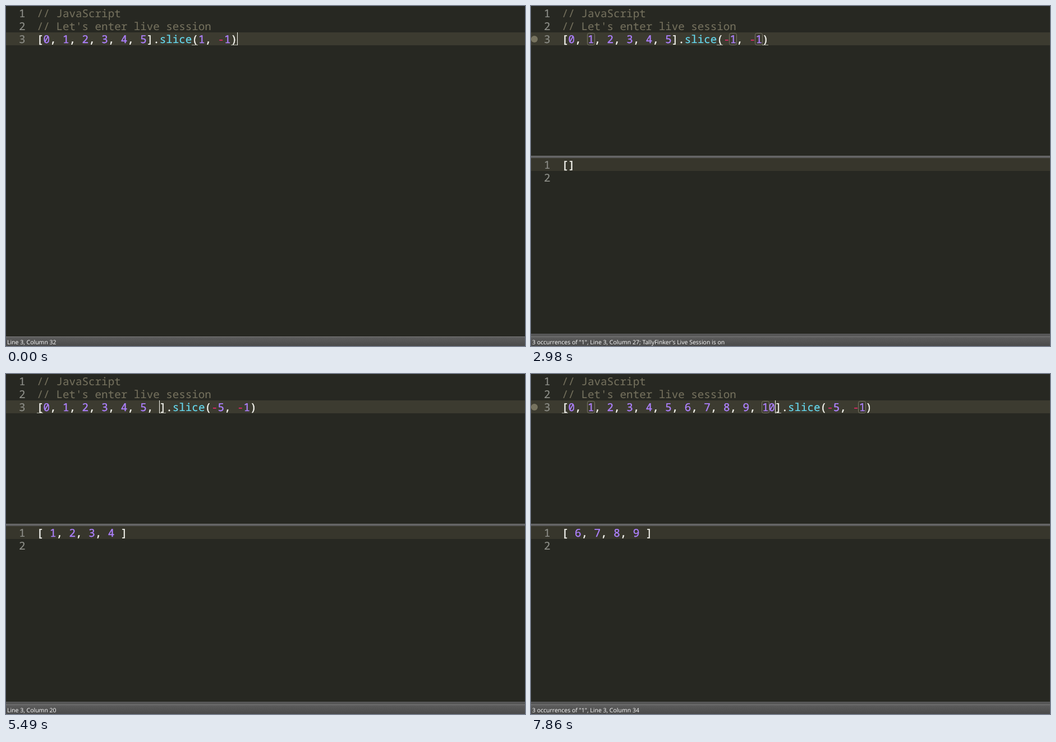
An HTML page that plays this animation: 925x606 px, repeating every 8000 ms.

```html
<!DOCTYPE html>
<html lang="en">
<head>
<meta charset="utf-8">
<title>Live session</title>
<style>
  html, body { margin: 0; width: 100%; height: 100%; overflow: hidden; background: #272822; }
  svg { display: block; width: 925px; height: 606px; }
  text { white-space: pre; text-rendering: geometricPrecision; }
  .code { font: 19.2px "Noto Sans Mono", "DejaVu Sans Mono", monospace; }
  .code text, .code tspan { --ink: #f8f8f2; fill: var(--ink); stroke: var(--ink); stroke-width: .4px; }
  .code .gutter { --ink: #8f908a; stroke-width: .2px; }
  .code .comment { --ink: #75715e; stroke-width: .1px; }
  .code .num { --ink: #ae81ff; }
  .code .op { --ink: #f92672; stroke: none; }
  .code .fn { --ink: #66d9ef; stroke-width: .2px; }
  #status { font: 10.52px "Open Sans", "Noto Sans", sans-serif; fill: #fff; }
  #boxes rect { fill: none; stroke: #7b7867; }
  #marks rect { fill: #b0b0a5; }
</style>
</head>
<body>
<svg viewBox="0 0 925 606">
  <defs>
    <linearGradient id="bar" x2="0" y2="1">
      <stop offset="0" stop-color="#5e5e5e"/>
      <stop offset="1" stop-color="#4a4a4a"/>
    </linearGradient>
  </defs>
  <rect width="925" height="606" fill="#272822"/>
  <rect y="47" width="925" height="23" fill="#3c3b30"/>
  <circle id="dot" cx="6" cy="59" r="6" fill="#77735f"/>
  <g class="code">
    <text class="gutter" x="23" y="20">1</text>
    <text class="gutter" x="23" y="43">2</text>
    <text class="gutter" x="23" y="66">3</text>
    <text class="comment" x="55" y="20">// JavaScript</text>
    <text class="comment" x="55" y="43">// Let's enter live session</text>
    <text id="input" x="55" y="66"></text>
  </g>
  <g id="marks"></g>
  <g id="boxes"></g>
  <rect id="caret" y="47" width="1" height="23" fill="#f8f8f0"/>
  <g id="panel">
    <rect y="267" width="925" height="4" fill="#5d5d5d"/>
    <rect y="267" width="925" height="1" fill="#7a7a7a"/>
    <rect y="271" width="925" height="23" fill="#37362c"/>
    <rect y="584" width="925" height="5" fill="#575757"/>
    <g class="code">
      <text class="gutter" x="23" y="290">1</text>
      <text class="gutter" x="23" y="313">2</text>
      <text id="output" x="55" y="290"></text>
    </g>
  </g>
  <rect y="589" width="925" height="17" fill="url(#bar)"/>
  <rect y="589" width="925" height="1" fill="#7a7a7a"/>
  <text id="status" x="2" y="603"></text>
</svg>
<script>
const LOOP = 8000, LEFT = 55, CELL = 11.52;
const $ = id => document.getElementById(id);
const upTo = n => Array.from({ length: n + 1 }, (_, i) => i).join(", ");

// Each step lists only what changes; col 0 keeps the caret at the end of the list.
const steps = [
  [0, { list: upTo(5), args: "1, -1", col: 32, caret: true, dot: false,
        open: false, live: false, out: 1, word: "" }],
  [540, { caret: false }],
  [820, { open: true, live: true }],
  [1250, { caret: true }],
  [1530, { col: 31 }],
  [1680, { col: 29 }],
  [1930, { col: 28 }],
  [2090, { col: 26 }],
  [2280, { args: "-1, -1", col: 27, dot: true }],
  [2440, { word: "1" }],
  [2600, { out: 0 }],
  [2820, { caret: false }],
  [3140, { col: 28, caret: true }],
  [3600, { args: "-5, -1", word: "5" }],
  [3760, { out: 1 }],
  [3920, { dot: false }],
  [4080, { col: 27 }],
  [4220, { col: 26, word: "" }],
  [4380, { col: 25 }],
  [4660, { col: 19 }],
  [4800, { col: 0, word: "5" }],
  [5220, { list: upTo(5) + ",", dot: true, live: false }],
  [5350, { list: upTo(5) + ", " }],
  [5490, { dot: false, word: "" }],
  [5810, { list: upTo(6), dot: true, word: "6" }],
  [5970, { list: upTo(6) + ", ", out: 2 }],
  [6090, { list: upTo(7), word: "7" }],
  [6230, { list: upTo(7) + ", ", out: 3 }],
  [6500, { list: upTo(8) + ",", out: 4, word: "8" }],
  [6660, { list: upTo(8) + ", " }],
  [7080, { list: upTo(9), word: "9" }],
  [7240, { list: upTo(9) + ",", out: 5 }],
  [7400, { list: upTo(9) + ", " }],
  [7560, { list: upTo(9) + ", 1", word: "1" }],
  [7700, { out: 6 }],
  [7860, { list: upTo(10) }]
];

const states = [];
for (const [at, change] of steps) states.push({ ...states.at(-1), ...change, at });

const paint = code => code.replace(/\d+|-|slice/g, s =>
  `<tspan class="${s === "-" ? "op" : s === "slice" ? "fn" : "num"}">${s}</tspan>`);
const cellX = i => LEFT + i * CELL;
const show = (id, on) => $(id).setAttribute("visibility", on ? "visible" : "hidden");

function bracketPair(code, pos) {
  for (const [a, b] of ["[]", "()"]) {
    const from = code.indexOf(a), to = code.indexOf(b);
    if (from <= pos && pos <= to + 1) return [from, to];
  }
  return [];
}

function render(s) {
  const code = `[${s.list}].slice(${s.args})`;
  const col = s.col || s.list.length + 2;
  $("input").innerHTML = paint(code);
  $("output").innerHTML = paint(s.out ? `[ ${[0, 1, 2, 3].map(i => s.out + i).join(", ")} ]` : "[]");

  $("marks").innerHTML = bracketPair(code, col - 1).map(i =>
    `<rect x="${Math.round(cellX(i))}" y="69" width="11" height="1"/>`).join("");

  const hits = s.word ? [...code.matchAll(s.word)].map(m => m.index) : [];
  $("boxes").innerHTML = hits.map(i =>
    `<rect x="${Math.floor(cellX(i)) - .5}" y="48.5" width="13" height="21" rx="3"/>`).join("");

  $("caret").setAttribute("x", Math.floor(cellX(col - 1)));
  show("caret", s.caret);
  show("dot", s.dot);
  show("panel", s.open);

  const found = s.word ? `${hits.length} occurrence${hits.length > 1 ? "s" : ""} of "${s.word}", ` : "";
  const session = s.live ? "; TallyFinker's Live Session is on" : "";
  $("status").textContent = `${found}Line 3, Column ${col}${session}`;
}

let shown;
function tick() {
  const t = performance.now() % LOOP;
  const state = states.findLast(s => s.at <= t);
  if (state !== shown) render(shown = state);
  requestAnimationFrame(tick);
}
tick();
</script>
</body>
</html>
```
